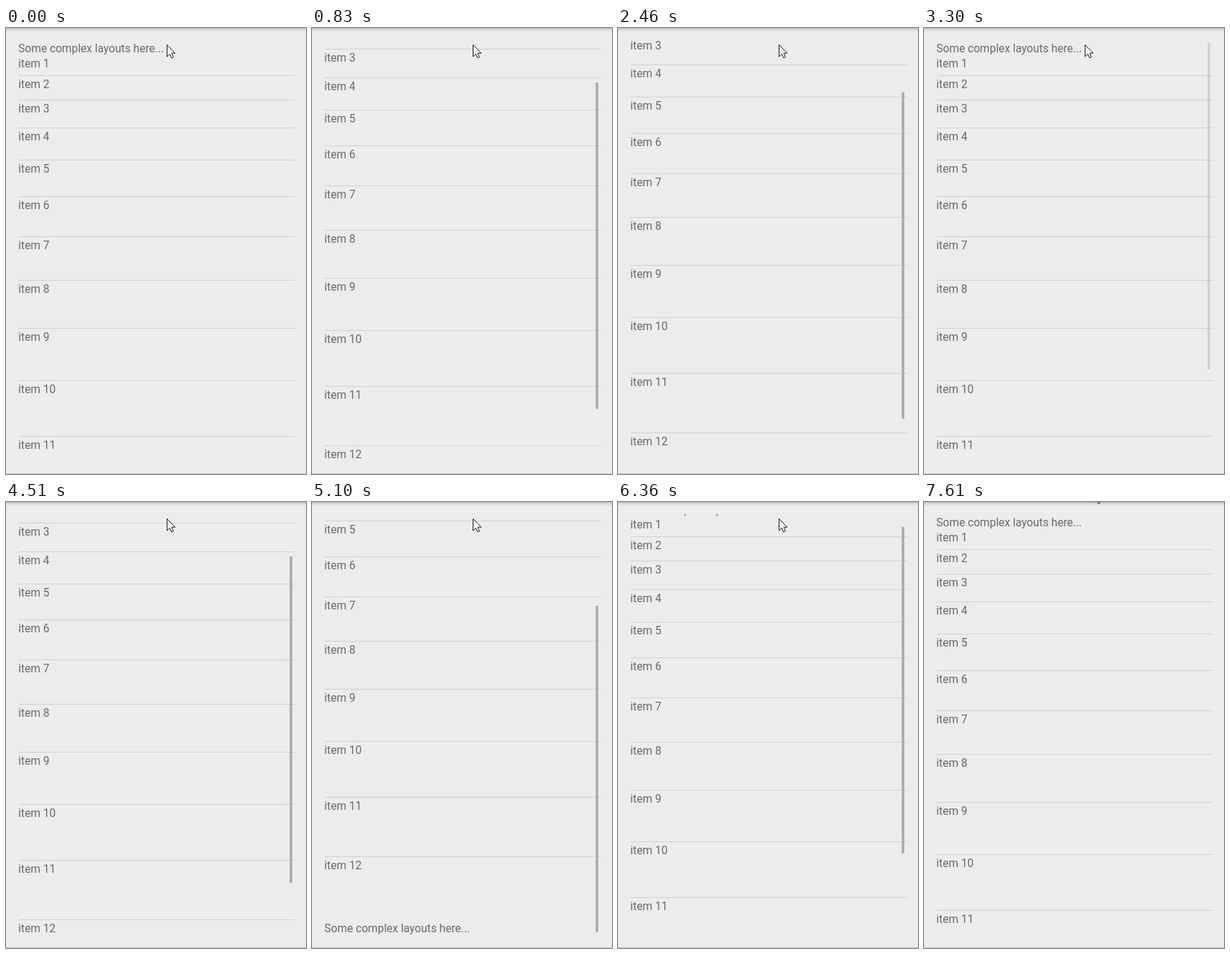
Recreate the animation shown at these times as an HTML page with a canvas. Size 420 px wide and 623 px high, loop 8040 ms.

```html
<!DOCTYPE html>
<html>
<head>
<meta charset="utf-8">
<style>
html, body { margin: 0; width: 100%; height: 100%; overflow: hidden; background: #ececec; }
canvas { display: block; }
</style>
</head>
<body>
<canvas id="stage" width="420" height="623"></canvas>
<script>
const ctx = document.getElementById('stage').getContext('2d');
const LOOP = 8040, NOTCH = 17.6, LAST_NOTCH = 9, NOTCHES_PER_TURN = 4;

// Moments of the wheel turns: three down, three up, twice over.
const turns = [830, 1080, 1230, 2460, 2770, 2910, 4510, 4820, 5100, 6210, 6360, 6640];

const clamp = (v, low, high) => Math.min(high, Math.max(low, v));

function wheelAt(t) {
  const done = turns.filter(time => time <= t);
  const notches = done.reduce((pos, _, i) => {
    const direction = i % 6 < 3 ? 1 : -1;
    return clamp(pos + direction * NOTCHES_PER_TURN, 0, LAST_NOTCH);
  }, 0);
  return { scroll: notches * NOTCH, idle: done.length ? t - done.pop() : Infinity };
}

// The scrollbar stays for a moment after each turn, then leaves in two steps.
const barAlpha = idle => idle < 390 ? 1 : idle < 520 ? 0.4 : 0;

// The pointer speeds up through the top edge in three jumps.
function cursorAt(t) {
  const jump = clamp(Math.floor((t - 7190) / 135) + 1, 0, 3);
  return [225 + Math.min(12, 6 * jump), 23 - 4.4 * jump * jump];
}

function drawList(scroll) {
  const label = 'Some complex layouts here...';
  const text = (str, y) => {
    ctx.fillStyle = '#6a6a6a';
    ctx.fillText(str, 17.3, Math.round(y - scroll));
  };
  ctx.save();
  ctx.beginPath();
  ctx.rect(17, 17, 388, 589);
  ctx.clip();
  ctx.font = '15.6px Roboto, sans-serif';
  text(label, 34);
  text('item 1', 55);
  // each row is a little taller than the one before
  for (let n = 2, y = 66.28, gap = 34.02; n <= 12; n++, y += gap, gap += 5.5) {
    ctx.fillStyle = '#d0d0d0';
    ctx.fillRect(17.6, Math.floor(y - scroll), 386.8, 1);
    text('item ' + n, y + 17.5);
  }
  text(label, 759.4);
  ctx.restore();
}

function drawBar(scroll, alpha) {
  ctx.globalAlpha = alpha;
  ctx.fillStyle = '#a9a9a9';
  ctx.fillRect(397.2, 21 + scroll * 0.783, 3.5, 456);
  ctx.globalAlpha = 1;
}

function drawBackground() {
  ctx.fillStyle = '#ececec';
  ctx.fillRect(0, 0, 420, 623);
  const shade = ctx.createLinearGradient(0, 0, 0, 6);
  shade.addColorStop(0, '#bcbcbc');
  shade.addColorStop(0.4, '#d9d9d9');
  shade.addColorStop(1, '#ececec');
  ctx.fillStyle = shade;
  ctx.fillRect(0, 0, 420, 6);
  ctx.fillStyle = '#c6c6c6';
  ctx.fillRect(0, 622, 420, 1);
}

const arrow = new Path2D('M.5 .5V17L4.3 13.4 6.9 18.8 9.4 17.7 7 12.2H11.8Z');

function drawCursor(x, y) {
  ctx.save();
  ctx.translate(x, y);
  ctx.fillStyle = '#fff';
  ctx.strokeStyle = '#111';
  ctx.fill(arrow);
  ctx.stroke(arrow);
  ctx.restore();
}

function draw(now) {
  const t = now % LOOP;
  const { scroll, idle } = wheelAt(t);
  drawBackground();
  drawList(scroll);
  drawBar(scroll, barAlpha(idle));
  drawCursor(...cursorAt(t));
}

let start;
function tick(now) {
  start ??= now;
  draw(now - start);
  requestAnimationFrame(tick);
}
draw(0);
requestAnimationFrame(tick);
</script>
</body>
</html>
```
